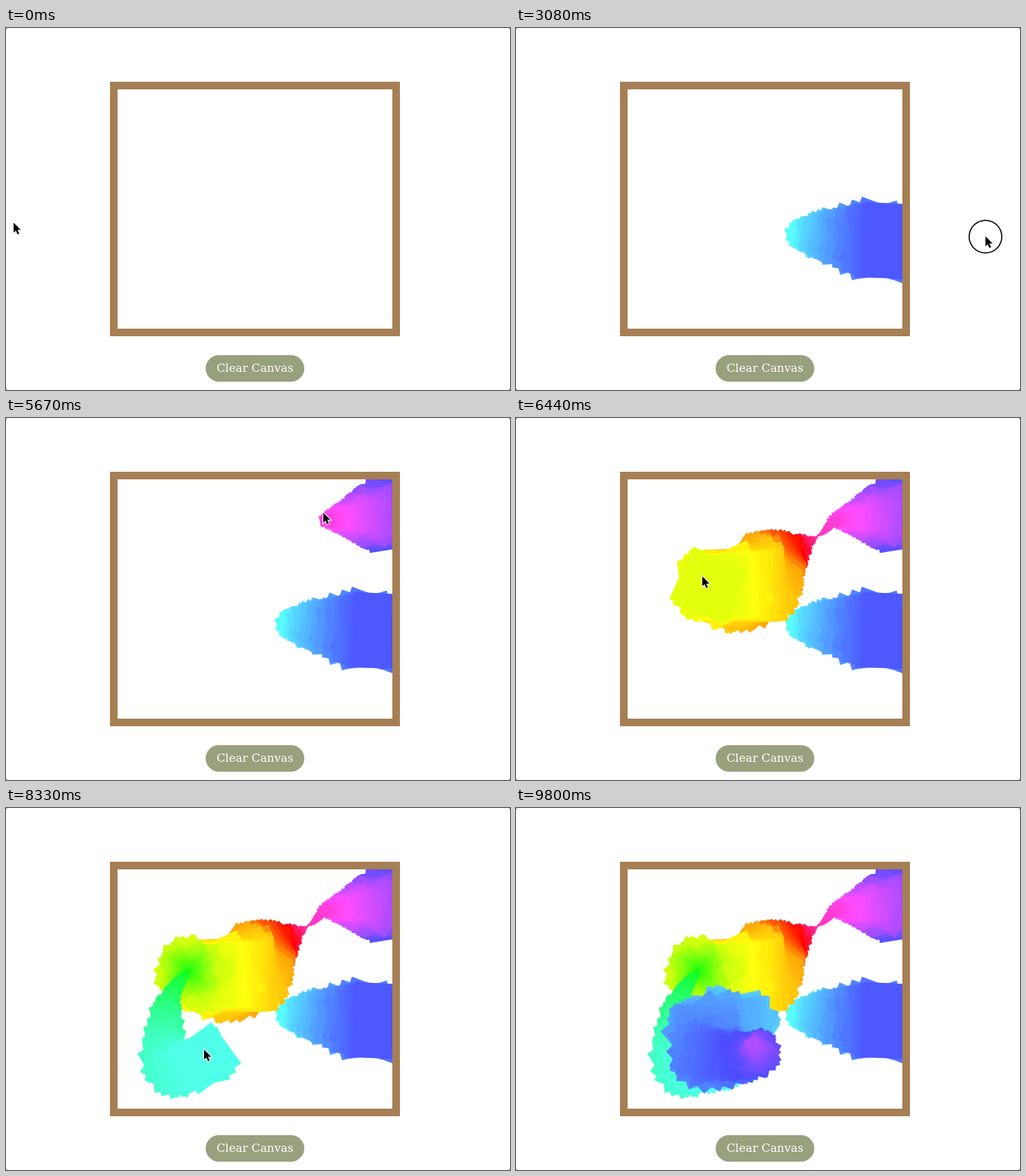
These frames come from a looping animation (664x478 px, 9870 ms). An HTML page with a canvas:

```html
<!DOCTYPE html>
<html lang="en">
<head>
<meta charset="utf-8">
<title>Canvas painting</title>
<style>
html, body { margin: 0; width: 664px; height: 478px; overflow: hidden; background: #fff; }
canvas { position: absolute; left: 0; top: 0; }
.clear {
  position: absolute; left: 263px; top: 432px; width: 130px; height: 35px;
  border-radius: 18px; background: #98a17d; color: #fff; text-align: center;
  font: 15px/34px "DejaVu Serif", serif;
}
</style>
</head>
<body>
<canvas id="stage" width="664" height="478"></canvas>
<div class="clear">Clear Canvas</div>
<script>
const ctx = document.getElementById('stage').getContext('2d');
const LOOP = 9870, TICK = 70;
const PRESS = 1190, RELEASE = 3500;

// Key points of each stroke: time, x, y, phase. Hue and width follow the phase.
const strokes = [
  [[PRESS, 372, 272, 175], [1960, 401, 274, 192], [2450, 470, 280, 222], [2750, 512, 282, 237]],
  [[5050, 518, 127, 245], [5670, 421, 135, 309], [5705, 402, 153, 318], [5810, 340, 190, 373],
   [5980, 305, 221, 407], [6270, 262, 222, 423], [6650, 240, 215, 433]],
  [[6930, 241, 216, 433], [7380, 240, 215, 491], [7760, 210, 268, 517], [8060, 208, 326, 535],
   [8180, 224, 345, 541], [8330, 264, 329, 549], [8560, 284, 298, 575], [8760, 250, 300, 590],
   [8950, 250, 324, 598], [9100, 272, 328, 606], [9500, 320, 322, 625], [9730, 312, 312, 648]]
];

const [first, ...rest] = strokes.map(keys => keys.map(([t, x, y]) => [t, x - 3, y - 10]));
const pointer = [
  [0, 10, 257], [280, 130, 251], [560, 272, 263], [770, 272, 263], [1050, 368, 262],
  ...first, [3080, 618.5, 275], [RELEASE, 622, 275], [3920, 620, 230],
  [4130, 620, 230], [4480, 619, 120], [4760, 619, 120], ...rest.flat()
];

// Monotone cubic interpolation of one channel
function at(keys, t, c) {
  const last = keys.length - 1;
  if (t <= keys[0][0]) return keys[0][c];
  if (t >= keys[last][0]) return keys[last][c];
  let i = 0;
  while (keys[i + 1][0] <= t) i++;
  const slope = j => (keys[j + 1][c] - keys[j][c]) / (keys[j + 1][0] - keys[j][0]);
  const tangent = j => {
    if (j === 0) return slope(0);
    if (j === last) return slope(last - 1);
    const a = slope(j - 1), b = slope(j);
    return a * b > 0 ? 2 * a * b / (a + b) : 0;
  };
  const span = keys[i + 1][0] - keys[i][0], u = (t - keys[i][0]) / span, v = 1 - u;
  return v * v * (1 + 2 * u) * keys[i][c] + u * u * (3 - 2 * u) * keys[i + 1][c] +
    span * u * v * (v * tangent(i) - u * tangent(i + 1));
}

// The brush swells and shrinks between 2 and 100
function brushWidth(phase) {
  const leg = 85, swing = Math.abs((phase - 237) % (2 * leg));
  return Math.max(2, 100 * Math.abs(1 - swing / leg));
}

// Pure hue, washed out where blue is strong; the hue lags a little past yellow
function paint(phase) {
  const hue = phase - Math.max(0, Math.min(16, (phase - 430) / 4));
  const rgb = [0, 8, 4].map(n => {
    const k = (n + hue / 30) % 12;
    return .5 - .5 * Math.max(-1, Math.min(k - 3, 9 - k, 1));
  });
  const lift = .3 * rgb[2] + .05 * rgb[1];
  return `rgb(${rgb.map(v => Math.round(255 * (v + (1 - v) * lift)))})`;
}

let seed = 7;
function random() {
  seed = seed * 16807 % 2147483647;
  return seed / 2147483647;
}

// One square dab per unit of phase, turned along the path with a rare strong tilt
function makeDabs(keys) {
  const dabs = [], end = keys[keys.length - 1][0];
  let [t, px, py, last] = keys[0];
  for (; t <= end; t += 5) {
    const phase = at(keys, t, 3);
    if (phase - last < .85) continue;
    const x = at(keys, t, 1), y = at(keys, t, 2);
    const step = Math.hypot(x - px, y - py);
    const heading = step > .3 ? Math.atan2(y - py, x - px) : 0;
    const tilt = .5 * (2 * random() - 1) ** 3;
    dabs.push({ t, x, y, step, angle: heading + tilt, w: brushWidth(phase), color: paint(phase) });
    px = x;
    py = y;
    last = phase;
  }
  return dabs;
}
const dabs = strokes.flatMap(makeDabs);

function drawDabs(t) {
  ctx.save();
  ctx.beginPath();
  ctx.rect(147, 81, 362, 316);
  ctx.clip();
  for (const d of dabs) {
    if (d.t > t) break;
    ctx.save();
    ctx.translate(d.x, d.y);
    ctx.rotate(d.angle);
    ctx.fillStyle = d.color;
    ctx.fillRect(-d.w / 2 - d.step, -d.w / 2, d.w + d.step, d.w);
    ctx.restore();
  }
  ctx.restore();
}

const arrow = new Path2D('M0 0V13.2L3 10.4L5.2 15.4L7.4 14.5L5.2 9.6H9.4Z');

function drawPointer(t) {
  ctx.save();
  ctx.translate(at(pointer, t, 1), at(pointer, t, 2));
  if (t >= PRESS && t < RELEASE) {
    ctx.strokeStyle = '#000';
    ctx.lineWidth = 1.5;
    ctx.beginPath();
    ctx.arc(0, .5, 21.5, 0, 2 * Math.PI);
    ctx.stroke();
  }
  ctx.strokeStyle = '#fff';
  ctx.lineWidth = 2;
  ctx.stroke(arrow);
  ctx.fillStyle = '#000';
  ctx.fill(arrow);
  ctx.restore();
}

function draw(t) {
  ctx.fillStyle = '#777';
  ctx.fillRect(0, 0, 664, 478);
  ctx.fillStyle = '#fff';
  ctx.beginPath();
  ctx.roundRect(0, 0, 664, 478, 3);
  ctx.fill();
  drawDabs(t);
  ctx.strokeStyle = '#a67f54';
  ctx.lineWidth = 10;
  ctx.strokeRect(142, 76, 372, 326);
  if (t < 9770) drawPointer(t);
}

const start = performance.now();
let shown = -1;
function frame() {
  const tick = Math.floor((performance.now() - start) % LOOP / TICK);
  if (tick !== shown) draw(tick * TICK);
  shown = tick;
  requestAnimationFrame(frame);
}
frame();
</script>
</body>
</html>
```
